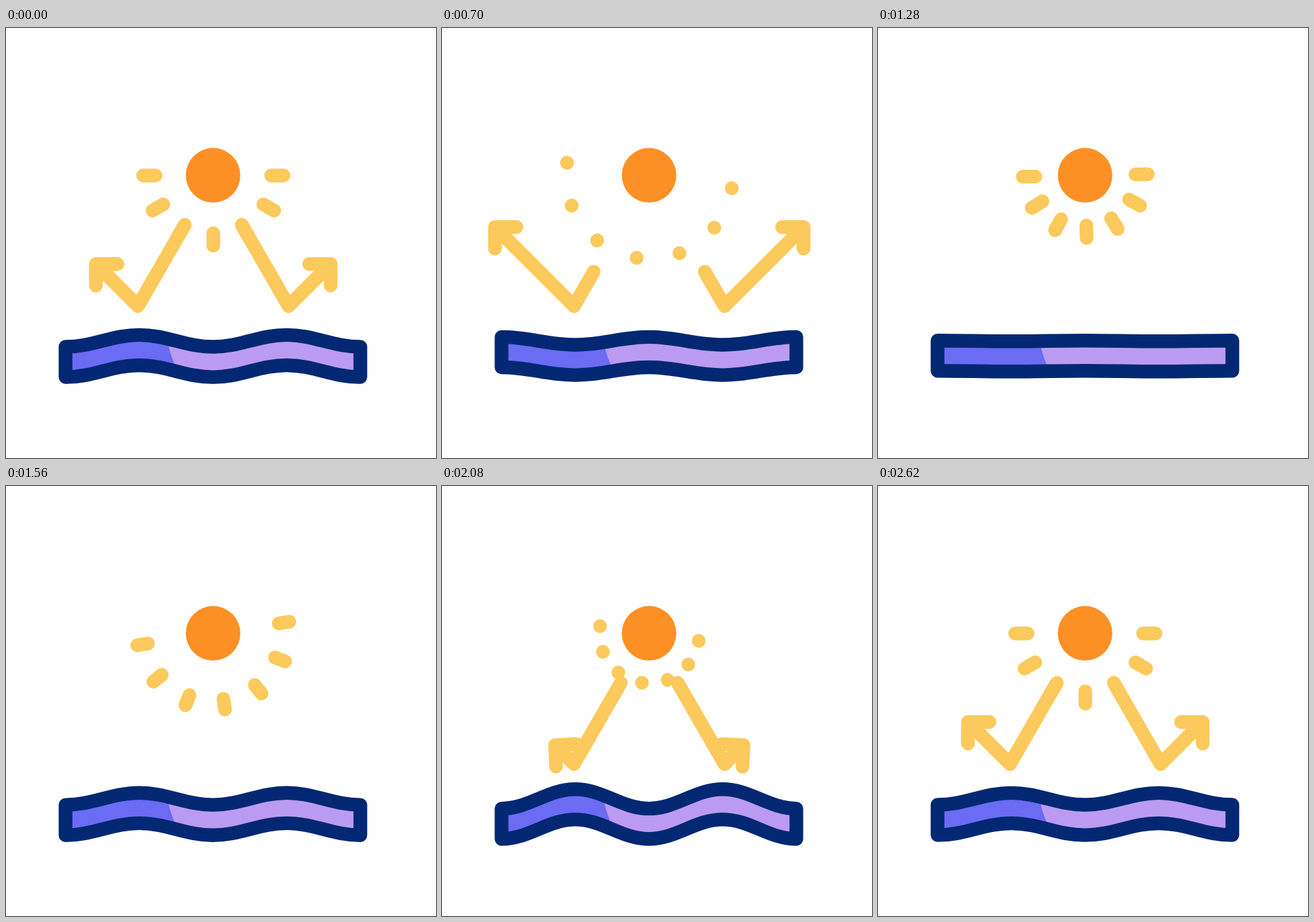
An HTML page with a canvas that plays this animation: 640x640 px, repeating every 3 s.

```html
<!DOCTYPE html>
<html lang="en">
<head>
<meta charset="utf-8">
<title>Sun reflection</title>
<style>
  html, body { margin: 0; width: 100%; height: 100%; overflow: hidden; background: #fff; }
  canvas { display: block; width: 640px; height: 640px; }
</style>
</head>
<body>
<canvas id="stage" width="640" height="640"></canvas>
<script>
const ctx = document.getElementById('stage').getContext('2d');
const LOOP = 3000, BEGIN = 220, FINISH = 2620;
const YELLOW = '#fcc95c', ORANGE = '#fc9025', NAVY = '#022873';
const VIOLET = '#6b6bf3', LILAC = '#ba9bf1';
const LINE = 20.4;
const SUN = { x: 308.2, y: 219.2, r: 40.6 };

const clamp = x => Math.min(1, Math.max(0, x));
const smooth = x => x * x * (3 - 2 * x);
const mix = (a, b, k) => a + (b - a) * k;
// Smooth step from 0 to 1 between two times.
const ease = (t, from, to) => smooth(clamp((t - from) / (to - from)));
const polar = (x, y, r, a) => [x + r * Math.cos(a), y + r * Math.sin(a)];

// Rays are born at NEAR, slide out to FAR, then start again.
const NEAR = 74.2, FAR = 124.5;

function rayEnd(t, rest, from, to) {
  if (t < 880) return mix(rest, FAR, ease(t, BEGIN, 740));
  if (t < 2080) return mix(NEAR, FAR, ease(t, from, to));
  return mix(NEAR, rest, ease(t, 2100, FINISH));
}

function swing(t) {
  return 8.8 * (ease(t, BEGIN, 590) - 2 * ease(t, 960, 1550)
    + 2 * ease(t, 1550, 2010) - ease(t, 2010, FINISH)) * Math.PI / 180;
}

function drawRays(t) {
  const inner = rayEnd(t, 86, 1256, 1880);
  const outer = Math.max(inner + 0.01, rayEnd(t, 104.5, 890, 1830));
  ctx.beginPath();
  for (let i = 0; i < 7; i++) {
    const a = i * Math.PI / 6 + swing(t);
    ctx.moveTo(...polar(308.6, 219.5, inner, a));
    ctx.lineTo(...polar(308.6, 219.5, outer, a));
  }
  ctx.stroke();
}

// The arrow runs down to the water, bounces and leaves upwards.
const START = { x: 266.1, y: 293 }, BOUNCE = { x: 196.4, y: 413.8 };
const LEG = Math.hypot(BOUNCE.x - START.x, BOUNCE.y - START.y);
const REST = LEG + 88.5, END = LEG + 166.3;

function along(d) {
  if (d > LEG) return polar(BOUNCE.x, BOUNCE.y, d - LEG, -0.75 * Math.PI);
  return [mix(START.x, BOUNCE.x, d / LEG), mix(START.y, BOUNCE.y, d / LEG)];
}

function arrowSpan(t) {
  if (t < 1400) {
    return [END * clamp((t - BEGIN) / 894) ** 2.15, mix(REST, END, ease(t, BEGIN, 670))];
  }
  return [0, REST * (1 - (1 - clamp((t - 1760) / 860)) ** 3.3)];
}

function drawArrow(tail, head) {
  const tip = along(head);
  const back = mix(-Math.PI / 3, Math.PI / 4, ease(head, 75, 190));
  const barb = side => polar(...tip, Math.min(32, head - tail), back + side * Math.PI / 4);
  ctx.beginPath();
  ctx.moveTo(...along(tail));
  if (tail < LEG && head > LEG) ctx.lineTo(BOUNCE.x, BOUNCE.y);
  ctx.lineTo(...tip);
  ctx.moveTo(...barb(-1));
  ctx.lineTo(...tip);
  ctx.lineTo(...barb(1));
  ctx.stroke();
}

function drawArrows(t) {
  const [tail, head] = arrowSpan(t);
  if (head - tail < 0.5) return;
  drawArrow(tail, head);
  ctx.save();
  ctx.translate(617, 0);
  ctx.scale(-1, 1);
  drawArrow(tail, head);
  ctx.restore();
}

// Height from crest to trough.
function swell(t) {
  const down = mix(17.6, -17.5, ease(t, BEGIN, 870));
  const up = mix(down, 31, ease(t, 870, 1920));
  return mix(up, 17.6, ease(t, 1920, 2560));
}

function waterPath(height) {
  const left = 88.6, step = 109.7, grip = 41;
  const path = new Path2D();
  const edge = (from, dir, base) => {
    const y = i => base + height / 2 * (i % 2 ? -1 : 1);
    path.lineTo(left + from * step, y(from));
    for (let n = 0; n < 4; n++) {
      const i = from + n * dir, j = i + dir;
      const x0 = left + i * step, x1 = left + j * step;
      path.bezierCurveTo(x0 + dir * grip, y(i), x1 - dir * grip, y(j), x1, y(j));
    }
  };
  edge(0, 1, 465.7);
  edge(4, -1, 510.8);
  path.closePath();
  return path;
}

function drawWater(t) {
  const water = waterPath(swell(t));
  ctx.fillStyle = LILAC;
  ctx.fill(water);
  ctx.save();
  ctx.clip(water);
  ctx.fillStyle = VIOLET;
  ctx.beginPath();
  ctx.moveTo(60, 450);
  ctx.lineTo(238, 450);
  ctx.quadraticCurveTo(241, 482, 255.5, 510);
  ctx.lineTo(270, 550);
  ctx.lineTo(60, 550);
  ctx.fill();
  ctx.restore();
  ctx.strokeStyle = NAVY;
  ctx.stroke(water);
}

function frame() {
  const t = performance.now() % LOOP;
  ctx.clearRect(0, 0, 640, 640);
  ctx.lineWidth = LINE;
  ctx.lineCap = ctx.lineJoin = 'round';
  ctx.strokeStyle = YELLOW;
  drawRays(t);
  drawArrows(t);
  ctx.fillStyle = ORANGE;
  ctx.beginPath();
  ctx.arc(SUN.x, SUN.y, SUN.r, 0, Math.PI * 2);
  ctx.fill();
  drawWater(t);
  requestAnimationFrame(frame);
}
frame();
</script>
</body>
</html>
```
